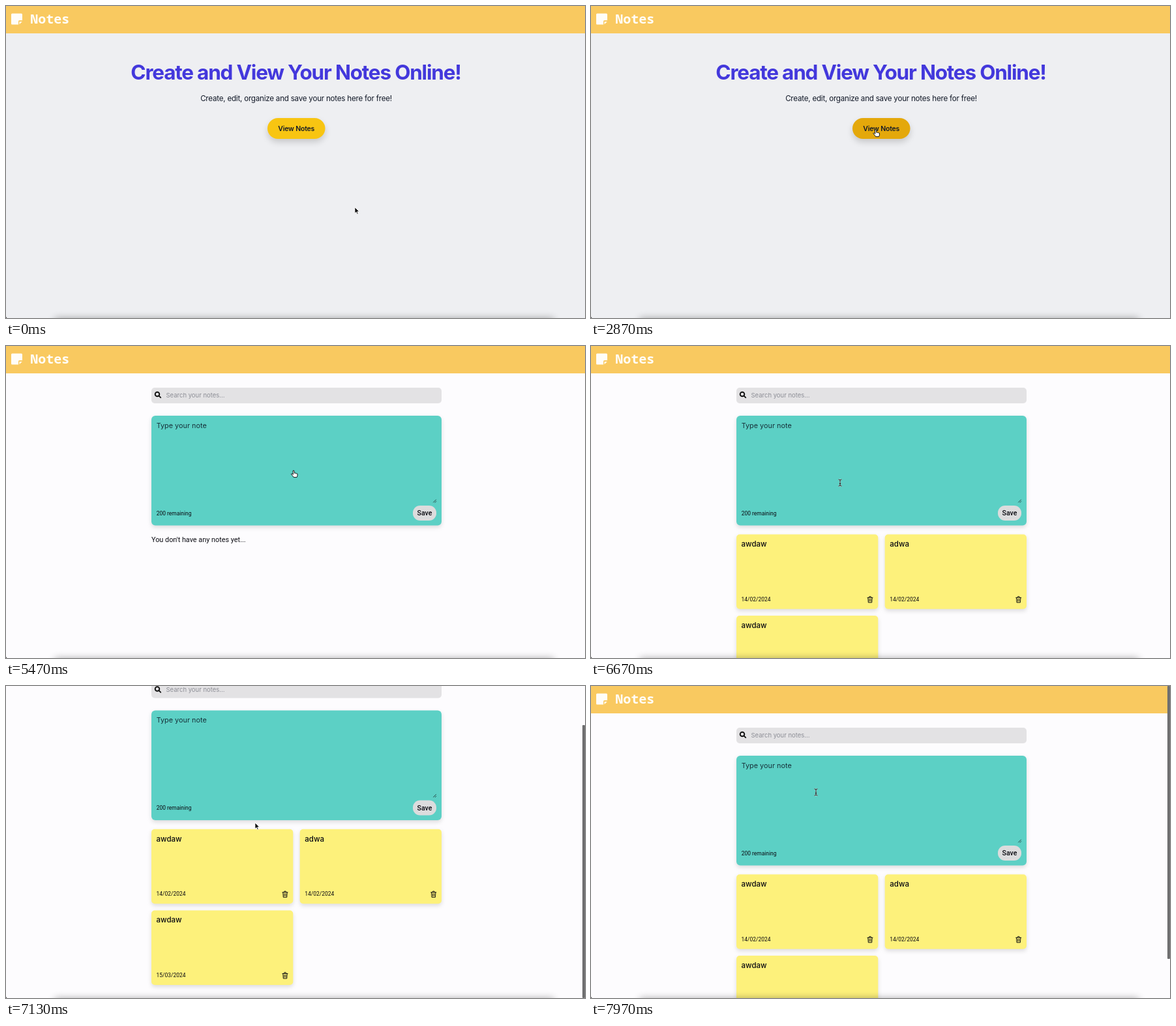
An HTML page that plays this animation: 888x479 px, repeating every 8 s.

```html
<!DOCTYPE html>
<html lang="en">
<head>
<meta charset="utf-8">
<title>Notes</title>
<style>
  html, body { margin: 0; width: 100%; height: 100%; overflow: hidden; }
  svg { display: block; width: 100vw; height: 100vh; }
  text { font-family: Inter, sans-serif; fill: #0b0b12; white-space: pre; }
  .mid { text-anchor: middle; }
  .brand { font: 700 20px "Noto Sans Mono", monospace; fill: #fffdf8; }
  .title { font-size: 31.5px; font-weight: 700; letter-spacing: -1.2px; fill: #4338dc; }
  .lead { font-size: 11.6px; letter-spacing: -.22px; fill: #111827; }
  .cta { font-size: 10.5px; font-weight: 600; letter-spacing: -.2px; fill: #111827; }
  .search { font-size: 9.5px; fill: #8d8e96; }
  .prompt { font-size: 10.85px; fill: #17313a; }
  .small { font: 400 8.45px Roboto, sans-serif; }
  .plain { font: 400 10.85px Roboto, sans-serif; }
  .save { font: 500 10.6px Roboto, sans-serif; }
  .note { font-size: 11.5px; font-weight: 500; }
  .card { filter: drop-shadow(0 3px 3px rgba(0, 0, 0, .13)); }
  .button { filter: drop-shadow(0 5px 5px rgba(0, 0, 0, .16)); }
  .shade { filter: blur(6px); }
  .line { fill: none; stroke: #111; stroke-linecap: round; stroke-linejoin: round; }
</style>
</head>
<body>
<svg viewBox="0 0 888 479" preserveAspectRatio="none">
  <rect id="page" width="888" height="479"/>

  <g id="home">
    <text class="title mid" x="444.5" y="112.5">Create and View Your Notes Online!</text>
    <text class="lead mid" x="445" y="145.5">Create, edit, organize and save your notes here for free!</text>
    <rect id="button" class="button" x="401" y="172" width="88.5" height="32" rx="16"/>
    <text class="cta mid" x="445.2" y="191.8">View Notes</text>
  </g>

  <g id="scroller">
    <rect width="888" height="42" fill="#f9c960"/>
    <path d="M8 13q0-1.500 1.500-1.500h14q1.500 0 1.500 1.500v9h-4.500q-1.500 0-1.500 1.500v5h-9.500q-1.500 0-1.500-1.500zM20.500 24h4.300l-4.300 4.300z" fill="#fffdf8"/>
    <text class="brand" x="37.300" y="27">Notes</text>

    <g id="app">
      <rect x="223" y="64" width="445" height="24" rx="5" fill="#e3e2e4"/>
      <g class="line" stroke-width="1.9">
        <circle cx="232" cy="74" r="3.300"/><path d="M234.600 76.600l2.600 2.600"/>
      </g>
      <text class="search" x="245.500" y="78.800">Search your notes...</text>
      <rect class="card" x="223" y="107" width="445" height="168.500" rx="6" fill="#5cd0c5"/>
      <text class="prompt" x="230.700" y="125.800">Type your note</text>
      <path class="line" stroke-width=".7" d="M655.500 240l4-4M658 240.300l1.700-1.700"/>
      <text class="small" x="230.700" y="259.500">200 remaining</text>
      <rect x="624" y="245" width="36" height="23" rx="11" fill="#dcdcdd"/>
      <text class="save mid" x="642" y="260">Save</text>
      <text id="empty" class="plain" x="223" y="300.500">You don't have any notes yet...</text>
      <g id="notes"></g>
    </g>
  </g>

  <rect id="scrollbar" x="884" width="4" height="419" rx="1" fill="#6f6f70"/>
  <rect class="shade" x="75" y="479" width="765" height="40" opacity=".3"/>
  <path d="M0 476q0 3 2 3h-2z"/>

  <g id="cursor" stroke-linejoin="round">
    <path id="arrow" d="M0 0v9.300l2.200-2 1.500 3.500 1.500-.700-1.500-3.400h3z" fill="#000" stroke="#fff" stroke-width=".8"/>
    <path id="hand" d="M-1 .7q1-1.500 2 0l.4 3.600q1-.8 1.700.2 1-.6 1.600.4 1.300-.4 1.400 1l-.3 2.900-.8 1.800h-4.800l-1.500-2.200-2.300-2.700q.4-1.300 1.800-.4l1.200.9z" fill="#fff" stroke="#000" stroke-width=".9"/>
    <g id="beam" fill="none">
      <path d="M-2.500-5q2 0 2.500 1 .5-1 2.500-1M0-4v8M-2.500 5q2 0 2.500-1 .5 1 2.500 1M-1.200 1.500h2.400" stroke="#fff" stroke-width="2" opacity=".6"/>
      <path d="M-2.500-5q2 0 2.500 1 .5-1 2.500-1M0-4v8M-2.500 5q2 0 2.500-1 .5 1 2.500 1M-1.200 1.500h2.400" stroke="#111" stroke-width="1"/>
    </g>
  </g>
</svg>
<script>
const LOOP = 8000, OPEN_APP = 5330, LOAD_NOTES = 5600, SCROLL_MAX = 69.5;
const $ = id => document.getElementById(id);
const show = (id, on) => { $(id).style.display = on ? '' : 'none'; };

const noteCard = (x, y, label, date) => `<g transform="translate(${x} ${y})">
  <rect class="card" width="217.300" height="114.500" rx="5" fill="#fdf17b"/>
  <text class="note" x="7.600" y="18.800">${label}</text>
  <text class="small" x="7.600" y="102.700">${date}</text>
  <path class="line" stroke-width="1" d="M201 97h8M203.300 96.800l.6-1.500h2.200l.6 1.500M201.800 97.200l.5 7.300h5.400l.5-7.300M203.900 99v3.600M206.100 99v3.600"/>
</g>`;
$('notes').innerHTML =
  noteCard(223, 289.3, 'awdaw', '14/02/2024') +
  noteCard(450.7, 289.3, 'adwa', '14/02/2024') +
  noteCard(223, 414, 'awdaw', '15/03/2024');

// Rows of time followed by values, eased between neighbours.
const pointer = [
  [0, 535, 309], [150, 535, 309], [850, 490, 254], [1550, 440, 194], [2500, 436, 190],
  [3300, 437, 190], [4030, 556, 240], [4170, 560, 272], [4250, 560, 272],
  [5000, 441, 191], [5850, 441, 191], [6450, 382, 210], [7650, 382, 210], [7940, 345, 163]
];
const scroll = [[6700, 0], [7060, SCROLL_MAX], [7380, SCROLL_MAX], [7780, 0]];

function sample(keys, t) {
  const next = keys.findIndex(key => key[0] > t);
  if (next < 1) return keys.at(next).slice(1);
  const [a, b] = [keys[next - 1], keys[next]];
  const u = (t - a[0]) / (b[0] - a[0]), eased = u * u * (3 - 2 * u);
  return a.slice(1).map((v, i) => v + (b[i + 1] - v) * eased);
}

function overButton(t) {
  const [x, y] = sample(pointer, Math.max(0, t));
  return x > 401 && x < 489 && y > 172 && y < 204;
}

// Share of the last 150 ms spent over the button.
function hoverAmount(t) {
  let hits = 0;
  for (let i = 0; i < 10; i++) hits += overButton(t - i * 15);
  return hits / 10;
}

function cursorKind(t, x, y, offset) {
  if (t < OPEN_APP) return overButton(t) ? 'hand' : 'arrow';
  if (t < 5900) return 'hand';
  return x > 231 && x < 660 && y + offset > 115 && y + offset < 241 ? 'beam' : 'arrow';
}

function draw(t) {
  const inApp = t >= OPEN_APP, loaded = t >= LOAD_NOTES;
  const [x, y] = sample(pointer, t), [offset] = sample(scroll, t);

  $('page').setAttribute('fill', inApp ? '#fdfcfe' : '#eeeff2');
  show('home', !inApp);
  show('app', inApp);
  show('empty', !loaded);
  show('notes', loaded);
  show('scrollbar', t > 6700);
  $('scroller').setAttribute('transform', `translate(0 ${-offset})`);
  $('scrollbar').setAttribute('y', offset * 60 / SCROLL_MAX);

  const h = hoverAmount(t);
  $('button').setAttribute('fill', `rgb(${248 - 20 * h},${197 - 29 * h},${18 - 7 * h})`);

  const kind = cursorKind(t, x, y, offset);
  for (const id of ['arrow', 'hand', 'beam']) show(id, id === kind);
  $('cursor').setAttribute('transform', `translate(${x} ${y})`);
}

const start = performance.now();
function frame() {
  draw((performance.now() - start) % LOOP);
  requestAnimationFrame(frame);
}
frame();
</script>
</body>
</html>
```
